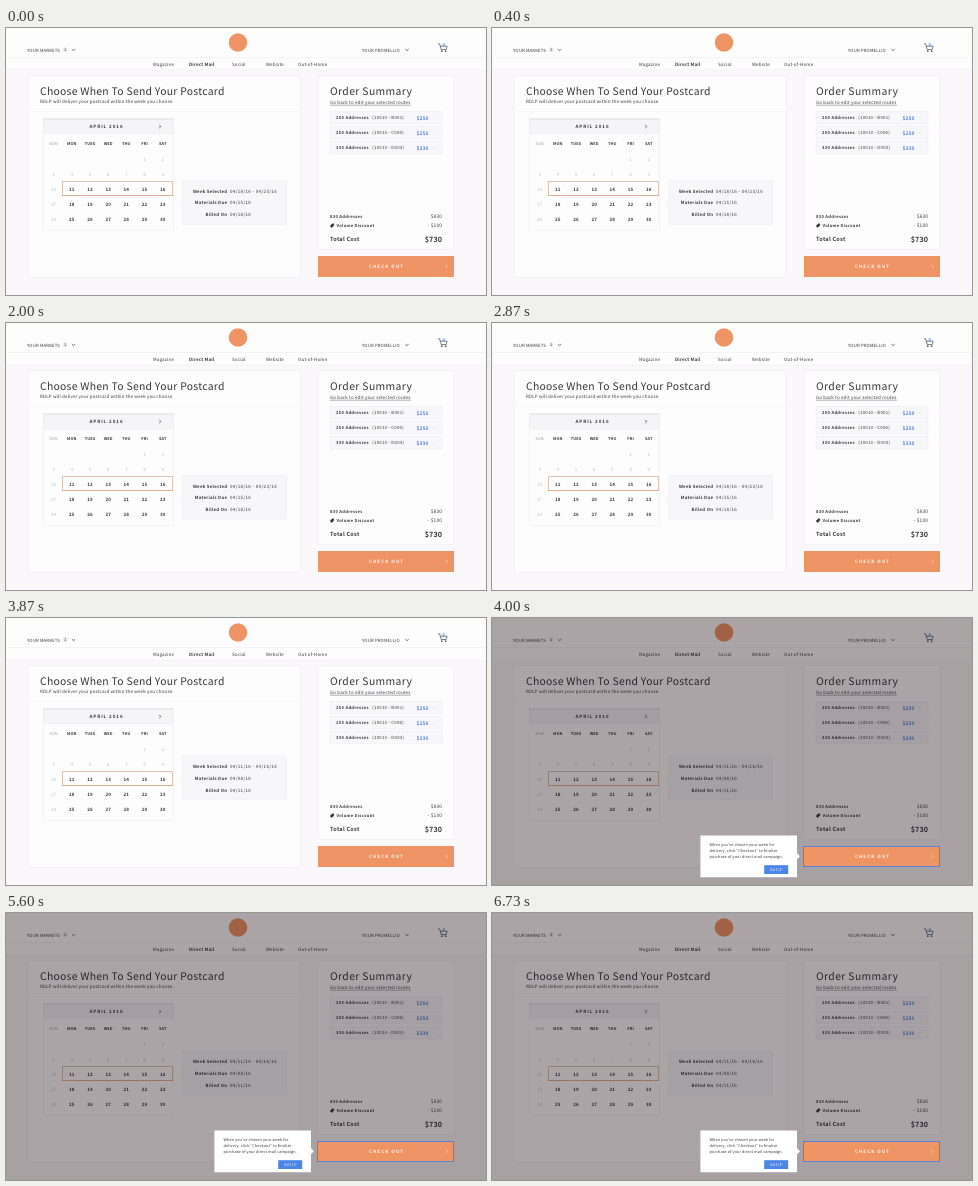
These frames come from a looping animation (480 by 267 pixels, 6.79 s). An HTML page:

```html
<!DOCTYPE html>
<html lang="en">
<head>
<meta charset="utf-8">
<title>Schedule a postcard</title>
<style>
  html, body { margin: 0; width: 100%; height: 100%; overflow: hidden; background: #faf8fa; }
  svg { display: block; width: 480px; height: 267px; }
  text {
    font-family: "Noto Sans CJK JP", "Noto Sans CJK SC", "Noto Sans CJK", "Noto Sans", sans-serif;
    text-rendering: geometricPrecision; white-space: pre;
  }
</style>
</head>
<body>
<svg id="stage" viewBox="0 0 480 267"></svg>
<script>
const LOOP = 6790, PICK_AT = 3000, DIALOG_AT = 4000;
const INK = '#38363c', PALE = '#bcbac0', BLUE = '#4a84e0', ORANGE = '#ef9464', RULE = '#eeecf0';
const stage = document.getElementById('stage');

function add(parent, tag, attrs, content = '') {
  const node = document.createElementNS('http://www.w3.org/2000/svg', tag);
  for (const key in attrs) node.setAttribute(key, attrs[key]);
  node.textContent = content;
  return parent.appendChild(node);
}
const group = (parent = stage) => add(parent, 'g', {});
const rect = (g, x, y, w, h, fill, stroke = 'none', width = .6) =>
  add(g, 'rect', { x, y, width: w, height: h, fill, stroke, 'stroke-width': width });
const path = (g, d, stroke, width = .6, fill = 'none') =>
  add(g, 'path', { d, stroke, 'stroke-width': width, fill });
const label = (g, x, y, content, size, spacing = 0, { bold, fill = INK, anchor = 'start' } = {}) =>
  add(g, 'text', {
    // trailing letter spacing must not shift aligned text
    x: x + spacing * { start: 0, middle: .5, end: 1 }[anchor], y, fill, 'font-size': size,
    'letter-spacing': spacing, 'font-weight': bold ? 700 : 400, 'text-anchor': anchor
  }, content);
const chevron = (g, x, y, stroke) => path(g, `M${x - .8} ${y - 1.6}l1.6 1.6l-1.6 1.6`, stroke, .7);

function drawHeader(g) {
  rect(g, 0, 0, 480, 42, '#fefdfe');
  path(g, 'M0 29.5H480M0 42H480', RULE);
  label(g, 21, 23.5, 'YOUR MARKETS', 4.3, .14);
  add(g, 'circle', { cx: 59.2, cy: 21.6, r: 2.6, fill: '#efedf1' });
  label(g, 59.2, 23, '2', 3.6, 0, { anchor: 'middle' });
  label(g, 356, 23.5, 'YOUR PROMELLIO', 4.3, .14);
  for (const x of [67.6, 401]) path(g, `M${x - 1.7} 21.1l1.7 1.6l1.7 -1.6`, INK, .7);
  add(g, 'circle', { cx: 232, cy: 14.5, r: 9.3, fill: ORANGE });

  path(g, 'M432 15.8h1.6l1.6 5.7h5l.9 -3.3h-6.8', '#59606e', .8);
  for (const x of [435.8, 439.6]) add(g, 'circle', { cx: x, cy: 23.2, r: .9, fill: '#59606e' });
  label(g, 437.6, 17.6, '0', 4, 0, { anchor: 'middle', fill: BLUE, bold: true });

  const tabs = [['Magazine', 147], ['Direct Mail', 183], ['Social', 226], ['Website', 260], ['Out-of-Home', 292]];
  tabs.forEach(([name, x], i) => label(g, x, 37.5, name, 4.48, .18, { bold: i === 1 }));
}

function drawCalendar(g) {
  rect(g, 37.3, 91, 130.4, 111.2, '#fefdfe', RULE);
  rect(g, 37.3, 91, 130.4, 15, '#f5f4f6', RULE);
  path(g, 'M37 91H168', '#d6d4d9');
  label(g, 100, 100.4, 'APRIL 2016', 4.48, .95, { bold: true, anchor: 'middle' });
  chevron(g, 154, 98.5, INK);

  const columnX = i => 47.5 + 18.2 * i;
  ['SUN', 'MON', 'TUES', 'WED', 'THU', 'FRI', 'SAT'].forEach((day, i) =>
    label(g, columnX(i), 117.3, day, 3.9, .1, { bold: true, anchor: 'middle', fill: i ? INK : PALE }));
  for (let day = 1; day <= 30; day++) {
    const cell = day + 4, column = cell % 7, row = Math.floor(cell / 7);
    const open = day > 10 && column > 0;
    label(g, columnX(column), 132.7 + 15 * row, day, 4.5, .1,
      { bold: open, anchor: 'middle', fill: open ? INK : PALE });
  }
  path(g, 'M56.5 167.5V153.5H166.5V167.5', '#d2b5a4', .8);
  path(g, 'M56 167.5H167', '#dd9c74', .8);
}

// Returns the panel, which moves with the picked week, and its value labels.
function drawWeekPanel(parent) {
  const panel = group(parent);
  path(panel, 'M176.5 152.3H280.3V196.4H176.5V177L174 174.5L176.5 172Z', RULE, .6, '#f7f6f8');
  ['Week Selected', 'Materials Due', 'Billed On'].forEach((name, i) =>
    label(panel, 221, 164.6 + 11.7 * i, name, 4.3, .28, { bold: true, anchor: 'end' }));
  const values = [0, 1, 2].map(i => label(panel, 224, 164.6 + 11.7 * i, '', 4.48, .35));
  return { panel, values };
}

function drawSchedule(g) {
  rect(g, 22, 47.5, 272.5, 202, '#fefdfe', RULE);
  path(g, 'M22 83.5H294.5', '#f4f2f5');
  label(g, 34, 66.8, 'Choose When To Send Your Postcard', 10.4, .27);
  label(g, 34, 74.6, 'RDLP will deliver your postcard within the week you choose.', 4.48, .155);
  drawCalendar(g);
}

function drawSummary(g) {
  rect(g, 312, 47.5, 136, 174, '#fefdfe', RULE);
  label(g, 324, 66.8, 'Order Summary', 10.4, .36);
  label(g, 324, 75.9, 'Go back to edit your selected routes', 4.48, .17);
  path(g, 'M324 77.2H405', INK, .4);

  const routes = [['250', '10010 - B001'], ['250', '10013 - C006'], ['330', '10013 - D003']];
  routes.forEach(([count, code], i) => {
    const y = 83.6 + 15 * i;
    rect(g, 324, y, 112, 12.4, '#f8f7f9', RULE);
    label(g, 330, y + 7.8, count + ' Addresses', 4.1, .32, { bold: true });
    label(g, 366.3, y + 7.8, `(${code})`, 4.3, .25);
    label(g, 410.6, y + 8, '$' + count, 4.9, .08, { bold: true, fill: BLUE });
    path(g, `M427.3 ${y + 5.4}l1.6 1.6m0 -1.6l-1.6 1.6`, '#d6d4da', .4);
  });

  label(g, 324, 189.6, '830 Addresses', 4.1, .3, { bold: true });
  label(g, 436, 189.6, '$830', 4.8, .2, { anchor: 'end' });
  path(g, 'M324 198l2.2 -2.3h1.7v1.7l-2.2 2.3z', INK, .3, INK);
  label(g, 330.5, 198.8, 'Volume Discount', 4.05, .3, { bold: true });
  label(g, 436, 198.8, '- $100', 4.8, .2, { anchor: 'end' });
  label(g, 324, 213.2, 'Total Cost', 5.6, .25, { bold: true });
  label(g, 436, 214.2, '$730', 7.2, .1, { bold: true, anchor: 'end' });
}

function drawCheckout(g) {
  rect(g, 312, 228, 136, 21, ORANGE);
  label(g, 380, 240.2, 'CHECK OUT', 4.5, 1.05, { bold: true, anchor: 'middle', fill: '#fffaf6' });
  chevron(g, 440.5, 238.4, '#fbdcc8');
}

function drawDialog(g) {
  rect(g, 311.5, 228.5, 136, 20, 'none', '#5880da', 1);
  path(g, 'M208.4 217.4H305V235.3L308 238.3L305 241.3V259.2H208.4Z', 'none', 0, '#fff');
  ['When you’ve chosen your week for', 'delivery, click “Checkout” to finalize', 'purchase of your direct mail campaign.']
    .forEach((line, i) => label(g, 217.5, 227.6 + 6.2 * i, line, 3.85, .1));
  rect(g, 272.2, 247.2, 24, 8.8, '#4a86e8');
  label(g, 284.2, 253.1, 'Got it!', 4.3, .13, { anchor: 'middle', fill: '#e6efff' });
}

const page = group();
drawHeader(page);
drawSchedule(page);
const week = drawWeekPanel(page);
drawSummary(page);
const shade = group();
rect(shade, 0, 0, 480, 267, 'rgba(20,8,12,.36)');
drawCheckout(group());
const dialog = group();
drawDialog(dialog);

const before = ['04/18/16 - 04/23/16', '04/15/16', '04/18/16'];
const after = ['04/11/16 - 04/16/16', '04/08/16', '04/11/16'];

function render(now) {
  const t = now % LOOP, picked = t >= PICK_AT;
  week.panel.setAttribute('transform', `translate(0 ${picked ? -14.5 : 0})`);
  week.values.forEach((node, i) => { node.textContent = (picked ? after : before)[i]; });
  for (const layer of [shade, dialog]) layer.setAttribute('visibility', t < DIALOG_AT ? 'hidden' : 'visible');
  requestAnimationFrame(render);
}
render(performance.now());
</script>
</body>
</html>
```
